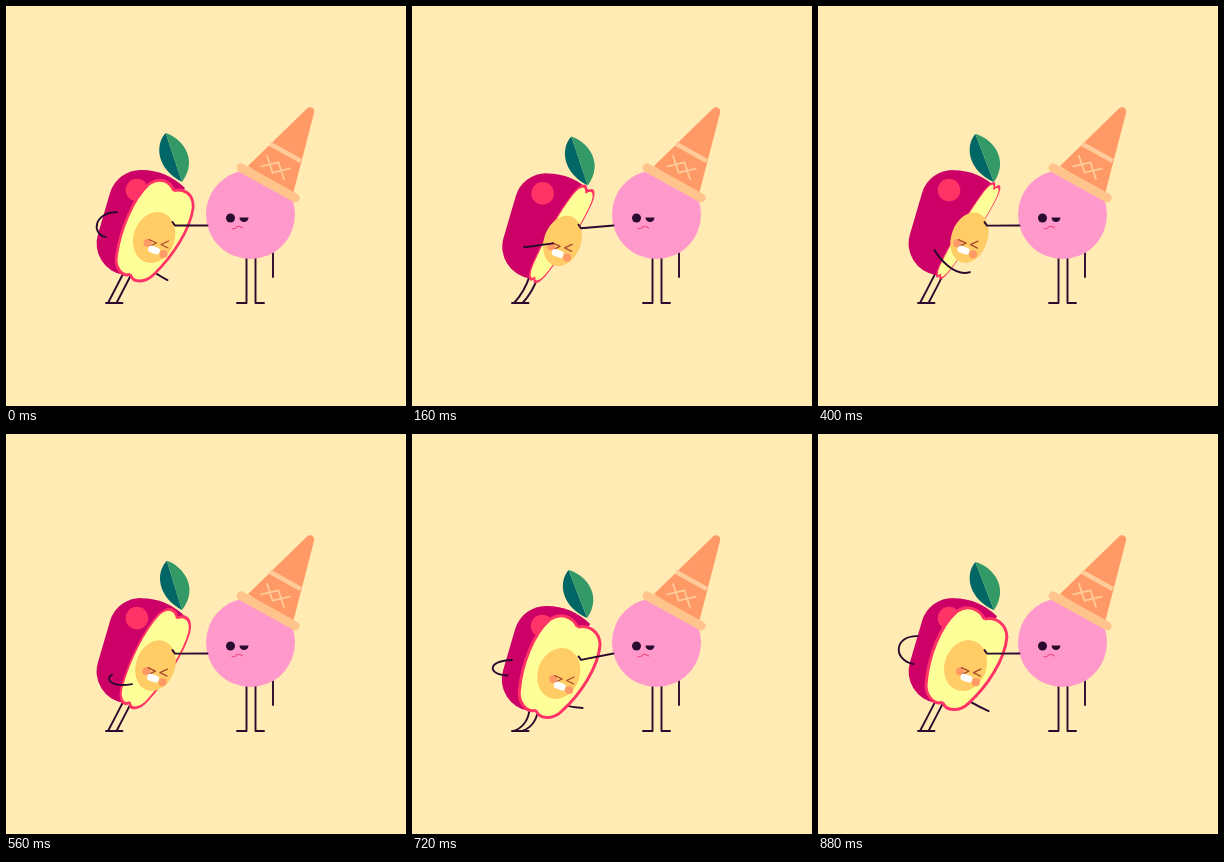
Write an HTML page that moves like this. It is 400x400 px and loops after 960 ms.

```html
<!DOCTYPE html>
<html lang="en">
<head>
<meta charset="utf-8">
<title>Apple and ice cream</title>
<style>
  html, body { margin: 0; width: 100%; height: 100%; overflow: hidden; background: #ffebb3; }
  svg { display: block; width: 100%; height: 100%; }
  .line { fill: none; stroke: #2b0a30; stroke-width: 1.9; stroke-linecap: round; stroke-linejoin: round; }
</style>
</head>
<body>
<svg viewBox="0 0 400 400">
  <!-- ice cream -->
  <g>
    <path class="line" d="M240.500 250V297H231M249.500 250V297H258M267 247V271"/>
    <circle cx="244.500" cy="208.500" r="44.500" fill="#ff99cc"/>
    <path d="M242 160L300 103.500Q302.500 100.500 305.500 101.500Q309 103 308 107L286.500 190Z" fill="#ff9966"/>
    <g transform="translate(269.500 161.500) rotate(29)" fill="none" stroke="#ffcc99">
      <path d="M-30 17H32" stroke-width="9" stroke-linecap="round" stroke="#ffc48c"/>
      <path d="M-16.500 -18H19" stroke-width="4.500"/>
      <path d="M-13 -6L0 6L13 -6M-13 6L0 -6L13 6" stroke-width="1.800" stroke-linecap="round" stroke-linejoin="round"/>
    </g>
    <circle cx="224.500" cy="212" r="4.500" fill="#2b0a30"/>
    <path d="M233.500 211.500H242.500A4.500 4.500 0 0 1 233.500 211.500Z" fill="#2b0a30"/>
    <path d="M226 222.500Q229 223.500 230.500 221Q233 219 236.500 222" fill="none" stroke="#f0487c" stroke-width="1.100" stroke-linecap="round"/>
  </g>

  <!-- apple -->
  <path id="farArm" class="line"/>
  <path id="legs" class="line"/>
  <g id="apple">
    <path d="M179 182Q160 164 136 164A32 32 0 0 0 104 187L92 228A32 32 0 0 0 118 269H122Z" fill="#cc0066"/>
    <circle cx="131" cy="184" r="11.300" fill="#ff3366"/>
    <path id="cut" fill="#ffff99" stroke="#ff3366" stroke-width="3" stroke-linejoin="round"/>
    <ellipse id="pit" cy="231.500" ry="26" fill="#ffcc66"/>
    <g id="face">
      <g fill="#ff9966">
        <circle cx="141.500" cy="237" r="4"/>
        <circle cx="157.500" cy="248" r="4"/>
      </g>
      <path d="M143 233.500L150.500 237L144 240M162.500 235L155 238.500L162 242" fill="none" stroke="#a9482c" stroke-width="1.200" stroke-linecap="round" stroke-linejoin="round"/>
      <rect x="-6" y="-3.500" width="12" height="7" rx="3.200" transform="translate(148 244) rotate(20)" fill="#fff"/>
    </g>
    <g id="leaf">
      <path d="M160 127C148 140 152 164 176 176Z" fill="#006666"/>
      <path d="M160 127C174 131 194 152 176 176Z" fill="#339966"/>
    </g>
  </g>
  <path id="nearArm" class="line"/>
  <path id="push" class="line"/>
</svg>
<script>
const $ = id => document.getElementById(id);
const set = (id, attrs) => { for (const k in attrs) $(id).setAttribute(k, attrs[k]); };
const mix = (a, b, s) => a + (b - a) * s;

const LOOP = 960, STEP = 80, COUNT = LOOP / STEP;

// Cosine over the loop (or a fraction of it) that peaks at step `peak`
const wave = (n, peak, steps = COUNT) => Math.cos((n - peak) * 2 * Math.PI / steps);

// A joint that circles (cx, cy) once per loop and follows the bob
const joint = (n, dip, cx, cy, ax, ay) =>
  `${cx + ax * wave(n, 4)} ${cy + ay * wave(n, 5) + dip}`;

// One half of the cut side; the other half is its mirror image
const half = m => `M0 -47C${9 * m} -54 ${22 * m} -53 ${28.5 * m} -41` +
  `C${37 * m} -20 ${33 * m} 12 ${24 * m} 35C${20 * m} 47 ${7 * m} 53 0 46`;

set('cut', { d: half(1) + half(-1) });

function leg(foot, hip, dip) {
  const hipY = 267 + dip;
  const mx = (foot + hip) / 2 + dip * 0.8;
  const my = (297 + hipY) / 2 + dip * 0.65;
  return `M${foot - 2} 297H${foot + 6}M${foot} 297Q${mx} ${my} ${hip} ${hipY}`;
}

function draw(ms) {
  const n = Math.floor((ms % LOOP) / STEP);
  const dip = 8 * ((1 - wave(n, 0, 6)) / 2) ** 3;
  const s = (1 + wave(n, 10)) / 2;
  const turn = s * s * (3 - 2 * s);
  const at = (...p) => joint(n, dip, ...p);

  set('apple', { transform: `translate(${-dip / 10} ${dip})` });
  set('cut', {
    transform: `translate(${mix(149, 145.2, turn)} ${mix(226, 227, turn)}) ` +
      `rotate(${mix(32, 26.6, turn)}) scale(${mix(0.24, 1, turn)} ${mix(1.08, 1, turn)})`
  });
  const px = mix(151.5, 147.5, turn);
  set('pit', { cx: px, rx: mix(18, 21, turn), transform: `rotate(20 ${px} 231.5)` });
  set('face', { transform: `translate(${mix(-2.5, 0.5, turn)} 0)` });
  set('leaf', { transform: `rotate(${-1.8 + 2.8 * wave(n, 1, 6)} 176 176)` });

  set('legs', { d: leg(102, 117.5, dip) + leg(110.5, 126, dip) });
  set('nearArm', {
    d: `M${at(106, 237, 12, 7)}C${at(98, 239, 27, 13)} ${at(106, 236, 35, 35)} ${at(126, 234, 30, 32)}`
  });
  set('farArm', { d: `M132 ${255 + dip}Q${at(146, 262, -10, -8)} ${at(149, 255, -25, -22)}` });
  const hand = 219.5 + dip * 0.8;
  set('push', { d: `M166.500 ${hand - 3.5}L169 ${hand}L201.500 219.500` });
}

function tick() {
  draw(performance.now());
  requestAnimationFrame(tick);
}
tick();
</script>
</body>
</html>
```
